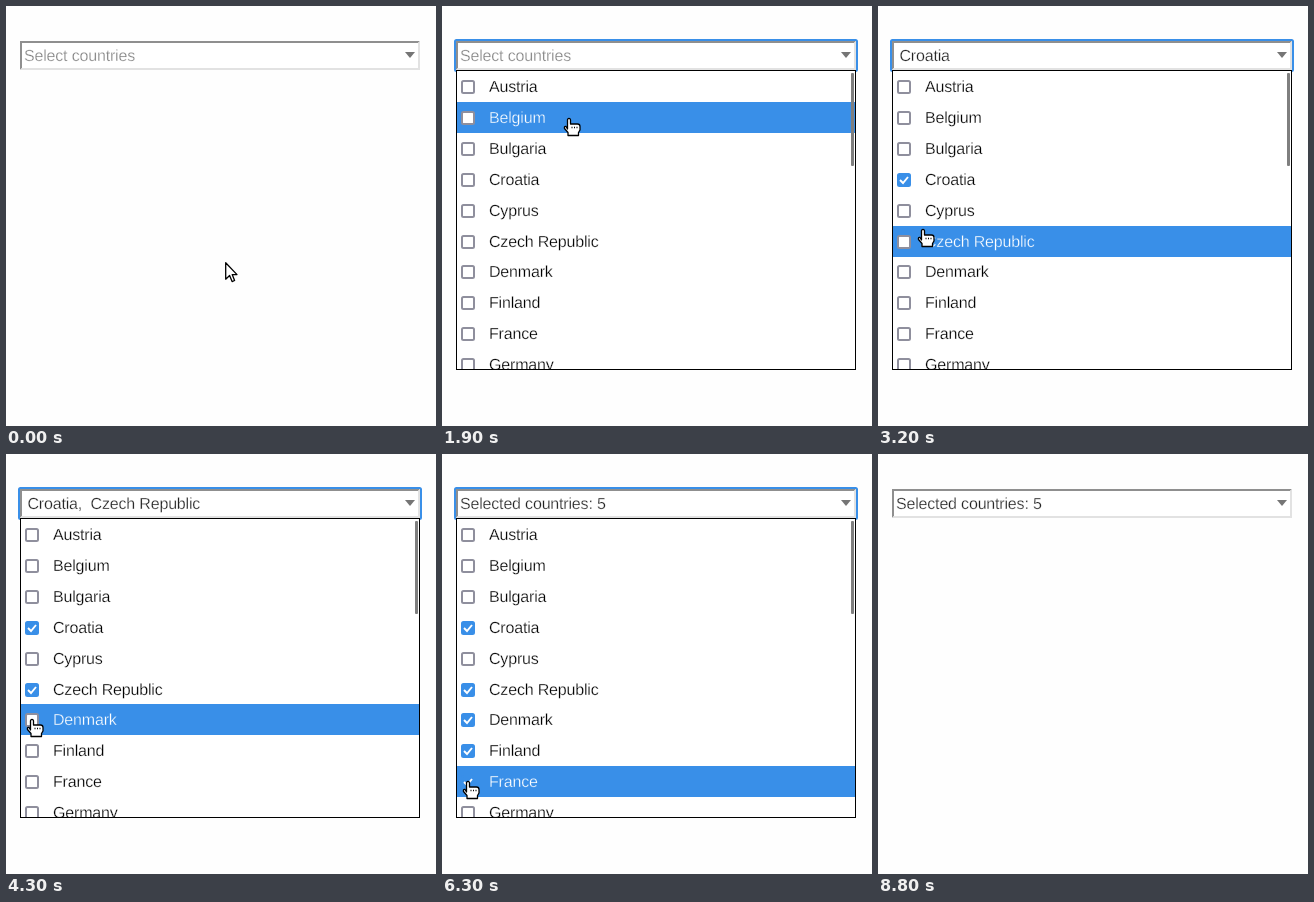
Write an HTML page that moves like this. It is 430 px wide and 420 px high and loops after 9.4 s.

```html
<!DOCTYPE html>
<html lang="en">
<head>
<meta charset="utf-8">
<title>Country multi-select</title>
<style>
  html, body { margin: 0; width: 100%; height: 100%; overflow: hidden; background: #fefefe; }
  svg { display: block; width: 430px; height: 420px; }
  text {
    font: 16px "Liberation Sans", Arial, sans-serif;
    letter-spacing: -.18px;
    text-rendering: geometricPrecision;
    fill: #000;
    /* a hairline in the background colour keeps the strokes thin */
    stroke: #fff;
    stroke-width: .3;
  }
  #value { fill: #222; }
  #value.empty { fill: #808080; }
  .bar { fill: none; }
  .box { fill: #fff; stroke: #8f8f9d; stroke-width: 2; }
  .tick { fill: none; stroke: none; stroke-width: 1.9; }
  .checked .box { fill: #398fe8; stroke: #398fe8; }
  .checked .tick { stroke: #fff; }
  .hover .bar { fill: #398fe8; }
  .hover text { fill: #fff; stroke: #398fe8; }
  .cursor { fill: #fff; stroke: #000; stroke-width: 1.3; stroke-linejoin: round; }
  .off { display: none; }
</style>
</head>
<body>
<svg viewBox="0 0 430 420">
  <defs><clipPath id="inside"><rect x="15" y="65" width="398" height="298"/></clipPath></defs>

  <rect id="ring" x="13" y="34" width="402" height="31" rx="1.5" fill="none" stroke="#398fe8" stroke-width="2"/>
  <rect x="14" y="35" width="400" height="29" fill="#fff"/>
  <path d="M14 64V35H414L412 37H16V62Z" fill="#8f8f8f"/>
  <path d="M414 35V64H14L16 62H412V37Z" fill="#e2e2e2"/>
  <path d="M399 46H409L404 52Z" fill="#757575"/>
  <text id="value" y="55"></text>

  <g id="list">
    <rect x="14.5" y="64.5" width="399" height="299" fill="#fff" stroke="#000"/>
    <g id="rows" clip-path="url(#inside)"></g>
    <rect x="409" y="67" width="3" height="93" rx="1" fill="#7f7f7f"/>
  </g>

  <path id="arrow" class="cursor" d="M.7 .8V17.2L4.6 13.5 7.1 19.6 9.6 18.5 7.2 12.6H12Z"/>
  <path id="hand" class="cursor" d="M-2.5 10V1Q-2.5-.5-1-.5T.5 1V5H7.5Q10 5 10 7.5V11L8.5 13.5V16.5H-2V13.5L-5.5 9.5Q-6 7-4 7.5ZM1.5 8.5h1M4 8.5h1M6.5 8.5h1"/>
</svg>
<script>
const LOOP = 9400, STEP = 100;
const OPEN = 1000, CLOSE = 7900, CLICK_DELAY = 200;
const TOP = 65, BOTTOM = 363, PITCH = 30.9;
const countries = ['Austria', 'Belgium', 'Bulgaria', 'Croatia', 'Cyprus',
  'Czech Republic', 'Denmark', 'Finland', 'France', 'Germany'];

const $ = id => document.getElementById(id);
const show = (el, on) => el.classList.toggle('off', !on);
const rowTop = i => Math.round(TOP + i * PITCH);

// A glide to a point; ease is the power of the slowdown, bow the sideways swing.
const glide = (start, end, x, y, { ease = 1.5, bow = 0 } = {}) => ({ start, end, x, y, ease, bow });
// A glide to a checkbox, which is clicked shortly after arrival.
const pick = (name, start, end, style) => {
  const row = countries.indexOf(name);
  return { ...glide(start, end, 27, rowTop(row) + 16, style), row, click: end + CLICK_DELAY };
};

const moves = [
  glide(0, 700, 138, 50),
  pick('Croatia', 1600, 2400, { bow: 50 }),
  pick('Czech Republic', 2900, 3600, { ease: 3, bow: 19 }),
  pick('Denmark', 3900, 4300),
  pick('Finland', 4600, 5000),
  pick('France', 5400, 6100),
  glide(6900, 7300, 64, 377, { ease: 3 }),
  glide(8100, 8800, 38, -22)
];

$('rows').innerHTML = countries.map((name, i) => `
  <g transform="translate(0 ${rowTop(i)})">
    <rect class="bar" x="15" width="398" height="31"/>
    <rect class="box" x="20" y="10" width="12" height="12" rx="1.5"/>
    <path class="tick" d="M22 16L25 19 30 13"/>
    <text x="47" y="21">${name}</text>
  </g>`).join('');
const rows = [...$('rows').children];

function pointerAt(t) {
  let x = 219, y = 256;
  for (const m of moves) {
    if (t < m.start) break;
    const k = Math.min((t - m.start) / (m.end - m.start), 1);
    const eased = 1 - (1 - k) ** m.ease;
    x += (m.x - x) * eased + m.bow * Math.sin(Math.PI * k);
    y += (m.y - y) * eased;
  }
  return [Math.round(x), Math.round(y)];
}

function label(picked) {
  if (!picked.length) return 'Select countries';
  if (picked.length > 4) return 'Selected countries: ' + picked.length;
  return picked.map(i => countries[i]).join(',\u00a0\u00a0');
}

function render(t) {
  const [x, y] = pointerAt(t);
  const open = t >= OPEN && t < CLOSE;
  const picked = moves.filter(m => m.click <= t).map(m => m.row);
  const nearest = Math.floor((Math.min(Math.max(y, TOP), BOTTOM) - TOP) / PITCH);
  const hovered = t > OPEN ? nearest : -1;

  show($('ring'), open);
  show($('list'), open);
  rows.forEach((row, i) => {
    row.classList.toggle('hover', i === hovered);
    row.classList.toggle('checked', picked.includes(i));
  });

  const value = $('value');
  value.textContent = label(picked);
  value.classList.toggle('empty', !picked.length);
  value.setAttribute('x', picked.length && picked.length < 5 ? 21.5 : 18);

  const overList = open && y >= TOP && y <= BOTTOM;
  show($('hand'), overList);
  show($('arrow'), !overList);
  $(overList ? 'hand' : 'arrow').setAttribute('transform', `translate(${x} ${y})`);
}

const start = performance.now();
let last = -1;
function tick() {
  const elapsed = (performance.now() - start) % LOOP;
  const t = Math.floor(elapsed / STEP) * STEP;
  if (t !== last) render(last = t);
  requestAnimationFrame(tick);
}
tick();
</script>
</body>
</html>
```
